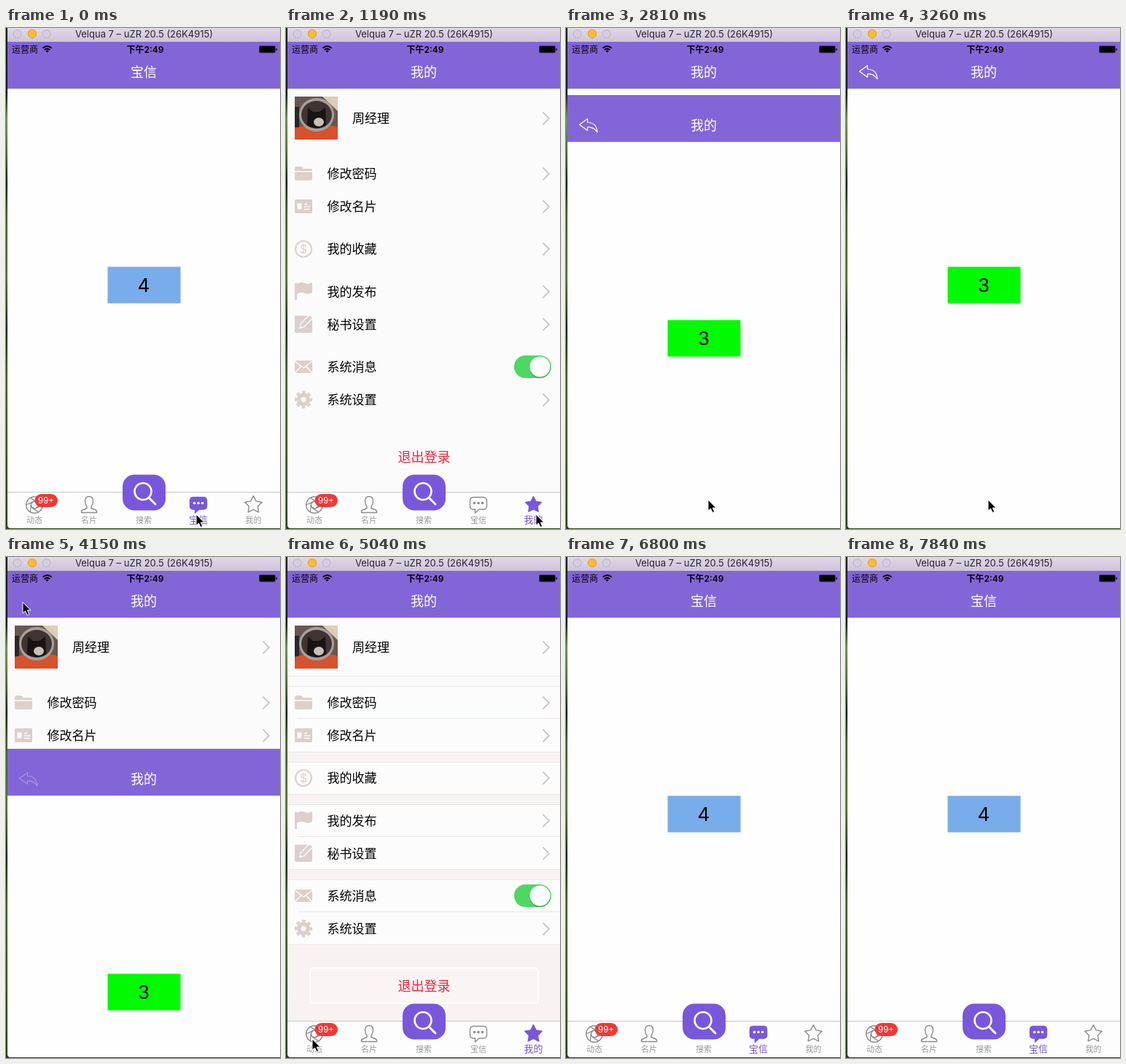
An HTML page for the animation above (8.43 s loop, 376 px wide and 687 px high).

```html
<!DOCTYPE html>
<html lang="zh">
<head>
<meta charset="utf-8">
<style>
html, body { margin: 0; width: 100%; height: 100%; overflow: hidden; }
svg { display: block; width: 376px; height: 687px; font-family: Inter, "Noto Sans CJK SC", "Noto Sans CJK", sans-serif; }
.mid { text-anchor: middle; }
.title { font-size: 18px; fill: #fff; text-anchor: middle; }
.num { font-size: 26px; text-anchor: middle; }
.row { font-size: 17px; }
.soft { fill: #dccfcc; }
.cut { fill: none; stroke: #fcfafa; stroke-width: 1.5; }
.tab { color: #8c8c8c; }
.tab.on { color: #7957dd; }
.shape { fill: none; stroke: currentColor; stroke-width: 1.4; stroke-linejoin: round; }
.on .shape { fill: currentColor; }
.line { fill: none; stroke: currentColor; stroke-width: 1.3; }
.on .line { stroke: #fff; }
.dot { fill: currentColor; }
.on .dot { fill: #fff; }
.tab text { font-size: 11px; font-weight: 300; fill: #999; text-anchor: middle; }
.tab.on text { font-size: 13px; font-weight: 400; fill: #7957dd; }
</style>
</head>
<body>
<svg viewBox="0 0 376 687">
  <defs>
    <linearGradient id="grass" x2="0" y2="1">
      <stop offset="0" stop-color="#1b2611"/><stop offset=".13" stop-color="#141c0e"/>
      <stop offset=".18" stop-color="#6d9150"/><stop offset=".24" stop-color="#557538"/>
      <stop offset=".31" stop-color="#17230d"/><stop offset=".37" stop-color="#42602a"/>
      <stop offset=".5" stop-color="#54752e"/><stop offset=".6" stop-color="#1d2b10"/>
      <stop offset=".7" stop-color="#456528"/><stop offset="1" stop-color="#2c4017"/>
    </linearGradient>
    <linearGradient id="chrome" x2="0" y2="1">
      <stop offset="0" stop-color="#e0d8e9"/><stop offset="1" stop-color="#cdc4d9"/>
    </linearGradient>
    <clipPath id="win"><path d="M2 0H376V686H7Q2 686 2 681Z"/></clipPath>
    <clipPath id="face"><path d="M12 94h59v59h-59z"/></clipPath>
  </defs>
  <rect width="376" height="687" fill="url(#grass)"/>
  <g clip-path="url(#win)">
    <rect x="2" width="374" height="687" fill="#fefefe"/>

    <g id="box">
      <rect x="139.5" y="327.5" width="100" height="50"/>
      <text class="num" x="189" y="361.5"></text>
    </g>

    <g id="mine">
      <rect x="2" y="83" width="374" height="554" fill="#fcfbfb"/>
      <g id="bands"></g>
      <g clip-path="url(#face)">
        <rect x="12" y="94" width="59" height="59" fill="#665850"/>
        <path d="M50 94h21v20z" fill="#dccdb8"/>
        <path d="M12 153v-15q14-7 30-1 16-6 29-1v17z" fill="#d8512c"/>
        <ellipse cx="42" cy="119" rx="24" ry="23" fill="#a6a09b"/>
        <ellipse cx="42" cy="119" rx="21" ry="19" fill="#3f3431"/>
        <path d="M29 133l1-24 7 6h9l8-6 1 24q-13 8-26 0z" fill="#171413"/>
        <ellipse cx="45" cy="129" rx="7" ry="6" fill="#c9bfb9"/>
        <path d="M12 108h6v28h-6z" fill="#2c2727"/>
      </g>
      <g id="rows"></g>
      <g class="soft">
        <path d="M12 192q0-2 2-2h7l3 3h10q2 0 2 2v1H12zM12 197.500h24v9.500q0 2-2 2H14q-2 0-2-2z"/>
        <rect x="12" y="235" width="24" height="19" rx="1.5"/>
        <path d="M12 350l3-1v24h-3zM15 351q6-4 11-1 5 2 10-1v14q-5 3-10 1-5-3-11 1z"/>
        <path d="M12 394.500H36V416q0 2-2 2H14q-2 0-2-2z"/>
        <path class="cut" d="M19 411.500l1-6L32.500 393l4.500 4.500-12.500 12.500z"/>
        <rect x="12" y="456" width="24" height="17" rx="1"/>
      </g>
      <path d="M15.500 240.500h6v8h-6z" fill="#fcfafa"/>
      <path class="cut" d="M25 241.500h4M25 245h8M25 248.500h8M12 457l12 9 12-9M12 473l8.500-9M36 473l-8.500-9"/>
      <circle cx="24" cy="303" r="11" fill="none" stroke="#dccfcc" stroke-width="2"/>
      <text class="mid soft" x="24" y="309" font-size="16">$</text>
      <circle cx="24" cy="509.500" r="6.300" fill="none" stroke="#dccfcc" stroke-width="5.500"/>
      <circle cx="24" cy="509.500" r="10.300" fill="none" stroke="#dccfcc" stroke-width="3.600" stroke-dasharray="4.600 3.490" stroke-dashoffset="2.300"/>
      <rect x="313" y="449" width="51" height="31" rx="15.500" fill="#4cd863"/>
      <circle cx="348.500" cy="466" r="14.300" fill="#0003"/>
      <circle cx="348.500" cy="464.500" r="14" fill="#fff"/>
      <text class="mid" x="189.500" y="594.500" font-size="18" fill="#f5223f">退出登录</text>
    </g>

    <rect x="2" y="636" width="374" height="51" fill="#fdfdfd"/>
    <path d="M2 636.500H376" stroke="#c9c7c9"/>
    <g id="bar"></g>
    <rect x="160" y="612.500" width="59" height="49" rx="16" fill="#7957dd"/>
    <path d="M196.500 644.500L205 653" stroke="#fff" stroke-width="3" stroke-linecap="round"/>
    <circle cx="188" cy="635.500" r="11.500" fill="none" stroke="#fff" stroke-width="2.600"/>
    <text class="mid" x="189" y="678.500" font-size="11" font-weight="300" fill="#999">搜索</text>

    <rect x="2" y="19" width="374" height="64" fill="#8266d8"/>
    <path d="M2 83.500H376" stroke="#dcd7e6"/>
    <text id="title" class="title" x="189" y="66.500"></text>
    <text id="action" x="291.500" y="66.500" font-size="17" fill="#fff">切换标签</text>

    <g id="modal">
      <rect x="2" y="19" width="374" height="668" fill="#fefefe"/>
      <rect x="2" y="19" width="374" height="64" fill="#8266d8"/>
      <path d="M2 83.500H376" stroke="#dcd7e6"/>
      <text class="title" x="189" y="66.500">我的</text>
      <path id="back" d="M18.500 59.500L29.500 51.500V56.500Q42 56.500 43 70Q38 62.500 29.500 63V67.500Z" fill="none" stroke="#fff" stroke-width="1.200" stroke-linejoin="round"/>
      <rect x="139.500" y="327.500" width="100" height="50" fill="#00fb00"/>
      <text class="num" x="189" y="361.500">3</text>
    </g>

    <text x="8" y="33.500" font-size="12">运营商</text>
    <g fill="none" stroke="#000" stroke-width="1.900">
      <path d="M50.500 27.500q6-5.200 12 0M52.700 30q3.800-3.200 7.600 0"/>
      <path d="M54.300 31.500q2.200-1.800 4.400 0l-2.200 2.300z" fill="#000" stroke="none"/>
    </g>
    <text class="mid" x="191" y="33.500" font-size="12" font-weight="600">下午2:49</text>
    <rect x="347.500" y="24.500" width="22" height="9.500" rx="1.500" stroke="#4a3a7c" stroke-width=".8"/>
    <path d="M370.500 27.500q1.500 .5 1.500 2t-1.500 2z"/>

    <rect x="2" width="374" height="19" fill="url(#chrome)"/>
    <g fill="#d6cede" stroke="#b9b1c0">
      <circle cx="15.500" cy="8" r="5.500"/>
      <circle cx="36" cy="8" r="5.700" fill="#fdbb2d" stroke="#dfa023"/>
      <circle cx="55.500" cy="8" r="5.500"/>
    </g>
    <text class="mid" x="189.500" y="13" font-size="13" fill="#28242c">Velqua 7 – uZR 20.5 (26K4915)</text>
  </g>
  <path id="cursor" d="M0 0V15.200L3.500 12L6 17.500L8.700 16.300L6.300 11H11Z" stroke="#fff"/>
</svg>
<script>
const $ = id => document.getElementById(id);
const LOOP = 8430, STEP = 147.8, TICK = 148;
const PRESENT = 2605, DISMISS = 4074, BANDS_FROM = 4730;

const polar = (r, deg) => {
  const a = deg * Math.PI / 180;
  return `${(r * Math.cos(a)).toFixed(2)} ${(r * Math.sin(a)).toFixed(2)}`;
};
const ring = (n, f) => Array.from({ length: n }, (_, i) => f(i));

// List page
const rows = [[124, '周经理', 91], [200, '修改密码'], [245, '修改名片'], [303, '我的收藏'],
  [361.5, '我的发布'], [406.5, '秘书设置'], [465, '系统消息'], [510, '系统设置']];
$('rows').innerHTML = rows.map(([y, label, x = 56.5]) =>
  `<text class="row" x="${x}" y="${y + 6}">${label}</text>` +
  (label === '系统消息' ? '' :
    `<path d="M352.500 ${y - 8.5}l8.500 8.500-8.500 8.500" fill="none" stroke="#cfc8c8" stroke-width="2"/>`)).join('');

const bands = [[83, 163], [177, 267], [281, 325], [339, 428], [442, 531]];
$('bands').innerHTML = '<rect x="2" y="83" width="374" height="553" fill="#f8f3f2"/>' +
  '<rect x="2" y="163" width="374" height="14" fill="#fcfafa"/>' +
  bands.map(([a, b]) =>
    `<rect x="1" y="${a + .5}" width="376" height="${b - a}" fill="#fdfcfc" stroke="#ece6e5"/>` +
    (b - a > 85 ? `<path d="M16 ${(a + b >> 1) - .5 + (a + b) % 2}H376" stroke="#ece6e5"/>` : '')).join('') +
  '<rect x="33" y="564" width="313" height="48" rx="4" fill="#faf5f4" stroke="#fff" stroke-width="2"/>';

// Tab bar
const blades = ring(6, i => `M${polar(11.5, i * 60)}L${polar(5, i * 60 + 78)}L${polar(5, i * 60 + 18)}`).join('');
const star = ring(10, i => polar(i % 2 ? 6.4 : 12.3, i * 36 - 90)).join('L');
const tabs = [
  [39, '动态', `<circle class="shape" r="11.300"/><path class="line" d="${blades}"/>`],
  [114, '名片', '<path class="shape" d="M-3 2Q-5.500-1-5.500-5Q-5.500-11.500 0-11.500T5.500-5Q5.500-1 3 2V4.500L9 7Q11 8 10.500 10.500H-10.500Q-11 8-9 7L-3 4.500Z"/>'],
  [264, '宝信', '<path class="shape" d="M-7-10.500H7Q11.500-10.500 11.500-6V1.500Q11.500 6 7 6H1L-4.500 11V6H-7Q-11.500 6-11.500 1.500V-6Q-11.500-10.500-7-10.500Z"/>' +
    ring(3, i => `<circle class="dot" cx="${i * 5.5 - 5.5}" cy="-2.500" r="1.800"/>`).join('')],
  [339.5, '我的', `<path class="shape" d="M${star}Z"/>`]
];
$('bar').innerHTML = tabs.map(([x, label, icon]) =>
  `<g class="tab"><g class="icon" data-x="${x}">${icon}</g><text x="${x}" y="678.500">${label}</text></g>`).join('') +
  '<g id="badge"><rect x="39.500" y="639" height="18" rx="9" fill="#f23838"/>' +
  '<text class="mid" y="652" font-size="11.500" fill="#fff"></text></g>';
const tabNodes = [...document.querySelectorAll('.tab')];

// [time, tab index]
const switches = [[-2000, 2], [880, 3], [5170, 0], [6790, 2]];
const content = { 0: ['#fffc00', '1'], 2: ['#78aceb', '4'] };
const bounce = [1, 1.3, .9, 1.15, .95, 1.02, 1].map((s, i) => [i * 1000 / 6, s]);
// [time, x, y]
const path = [[0, 261, 667], [140, 261, 667], [740, 343, 666], [1190, 343, 667], [1780, 138, 633],
  [2370, 195, 647], [3420, 195, 647], [4000, 23, 62], [4600, 23, 62], [5030, 36, 661],
  [5775, 38, 661], [5920, 163, 463], [6220, 330, 75], [6364, 352, 62], [6500, 390, 64]];

function track(keys, t) {
  const i = keys.findIndex(k => k[0] > t);
  if (i < 0) return keys[keys.length - 1].slice(1);
  if (!i) return keys[0].slice(1);
  const a = keys[i - 1], b = keys[i], u = (t - a[0]) / (b[0] - a[0]), e = u * u * (3 - 2 * u);
  return a.slice(1).map((v, j) => v + (b[j + 1] - v) * e);
}

// Share of a critically damped spring's way still to go
function remaining(ms) {
  const x = Math.max(0, ms) * .01826;
  return Math.exp(-x) * (1 + x);
}

const show = (node, on) => node.setAttribute('display', on ? 'inline' : 'none');

function draw(t) {
  const [since, page] = switches.filter(s => s[0] <= t).pop();
  tabNodes.forEach((node, i) => {
    const icon = node.querySelector('.icon'), on = i === page;
    node.classList.toggle('on', on);
    const scale = on ? track(bounce, t - since)[0] : 1;
    icon.setAttribute('transform', `translate(${icon.dataset.x} 654) scale(${scale})`);
  });

  const [rect, label] = $('badge').children, home = page === 0;
  rect.setAttribute('width', home ? 24.5 : 31.5);
  label.setAttribute('x', home ? 51.5 : 55);
  label.textContent = home ? '28' : '99+';
  if (home) $('bar').prepend($('badge')); else $('bar').append($('badge'));

  $('title').textContent = tabs[page][1];
  show($('action'), home);
  show($('mine'), page === 3);
  show($('bands'), t >= BANDS_FROM);
  show($('box'), page in content);
  if (page in content) {
    const [fill, digit] = content[page], [area, num] = $('box').children;
    area.setAttribute('fill', fill);
    num.textContent = digit;
  }

  const left = t < DISMISS ? remaining(t - PRESENT) : 1 - remaining(t - DISMISS);
  show($('modal'), t > PRESENT && t < 4600);
  $('modal').setAttribute('transform', `translate(0 ${Math.round(left * 668)})`);
  $('back').setAttribute('opacity', t < DISMISS ? 1 : .3);

  $('cursor').setAttribute('transform', `translate(${track(path, t)})`);
}

function frame() {
  const t = performance.now() % LOOP;
  draw(Math.floor(t / STEP) * TICK);
  requestAnimationFrame(frame);
}
frame();
</script>
</body>
</html>
```
